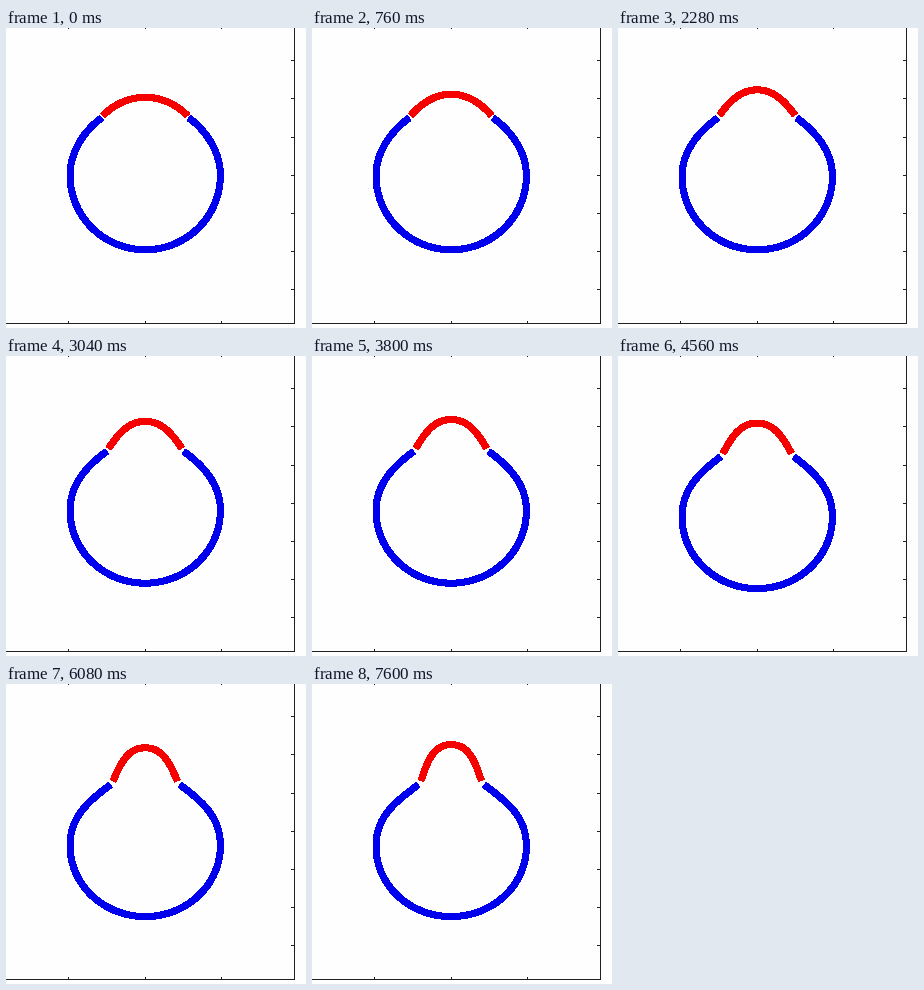
Write a matplotlib script that moves like this. It is 300 by 300 pixels and loops after 8000 ms.

```python
import numpy as np
import matplotlib.pyplot as plt
from matplotlib.animation import FuncAnimation

SIZE, DPI = 300, 100
INTERVAL, FRAMES = 40, 200
HOLD, LAST = 19, 10  # frames per pose, index of the last pose
MID, LEFT = 139.2, 64.0
PX = 72 / DPI
INK = "#202020"


def bezier(p0, p1, p2, p3, n=40):
    t = np.linspace(0, 1, n)[:, None]
    p0, p1, p2, p3 = map(np.array, (p0, p1, p2, p3))
    return ((1 - t) ** 3 * p0 + 3 * (1 - t) ** 2 * t * p1
            + 3 * (1 - t) * t ** 2 * p2 + t ** 3 * p3)


def mirror(half):
    """Add the right-hand side to a left half that ends on the middle line."""
    other = half[-2::-1].copy()
    other[:, 0] = 2 * MID - other[:, 0]
    return np.vstack([half, other])


def base(pose):
    """Lowest point: sinks in whole steps, with odd poses lifted."""
    level = round(0.2 * pose + 0.1 + 0.3 * (-1) ** pose)
    return 221.8 + 5.4 * level


def body(k, grow, bottom):
    x, y = 95.5 + 10.5 * grow, bottom - 131.8
    side = bottom - 74.5 + 4.5 * k
    shoulder = bezier((x, y), (x - 15.5 - 6.5 * k, y + 11 + 6 * k),
                      (LEFT, side - 25 - 6 * k), (LEFT, side))
    a = np.linspace(np.pi, np.pi / 2, 60)
    bowl = np.column_stack([MID + (MID - LEFT) * np.cos(a),
                            side + (bottom - side) * np.sin(a)])
    return mirror(np.vstack([shoulder, bowl[1:]]))


def cap(k, grow, bottom):
    top = bottom - 152.5 - 19.5 * grow
    x, y = 97 + 12 * grow, bottom - 134.2 - 2 * k
    return mirror(bezier((x, y), (x + 11 - 5 * k, y - 11.4 - 5 * k),
                         (MID - 16 - 3 * k, top), (MID, top)))


fig = plt.figure(figsize=(SIZE / DPI, SIZE / DPI), dpi=DPI, facecolor="#fefefe")
ax = fig.add_axes([0, 0, 1, 1])
ax.set_xlim(0, SIZE)
ax.set_ylim(SIZE, 0)
ax.axis("off")


def rule(x0, y0, x1, y1):
    ax.plot([x0, x1], [y0, y1], color=INK, lw=PX,
            solid_capstyle="butt", snap=False)


rule(288.5, 0, 288.5, 296)
rule(0, 295.5, 289, 295.5)
for x in np.floor(62.7 + 76.4 * np.arange(3)) + 0.5:
    rule(x, 0, x, 1)
    rule(x, 293, x, 295)
for y in np.floor(32.7 + 38.2 * np.arange(7)) + 0.5:
    rule(285, y, 288, y)

style = dict(lw=6 * PX, solid_capstyle="butt", solid_joinstyle="round",
             antialiased=False)
blue, = ax.plot([], [], color="#0000ee", **style)
red, = ax.plot([], [], color="#f60000", **style)


def draw(frame):
    pose = min(frame // HOLD, LAST)
    k = pose / LAST
    shape = k, k ** 0.8, base(pose)
    blue.set_data(*body(*shape).T)
    red.set_data(*cap(*shape).T)
    return blue, red


anim = FuncAnimation(fig, draw, frames=FRAMES, interval=INTERVAL,
                     repeat=True, repeat_delay=0)
plt.show()
```
